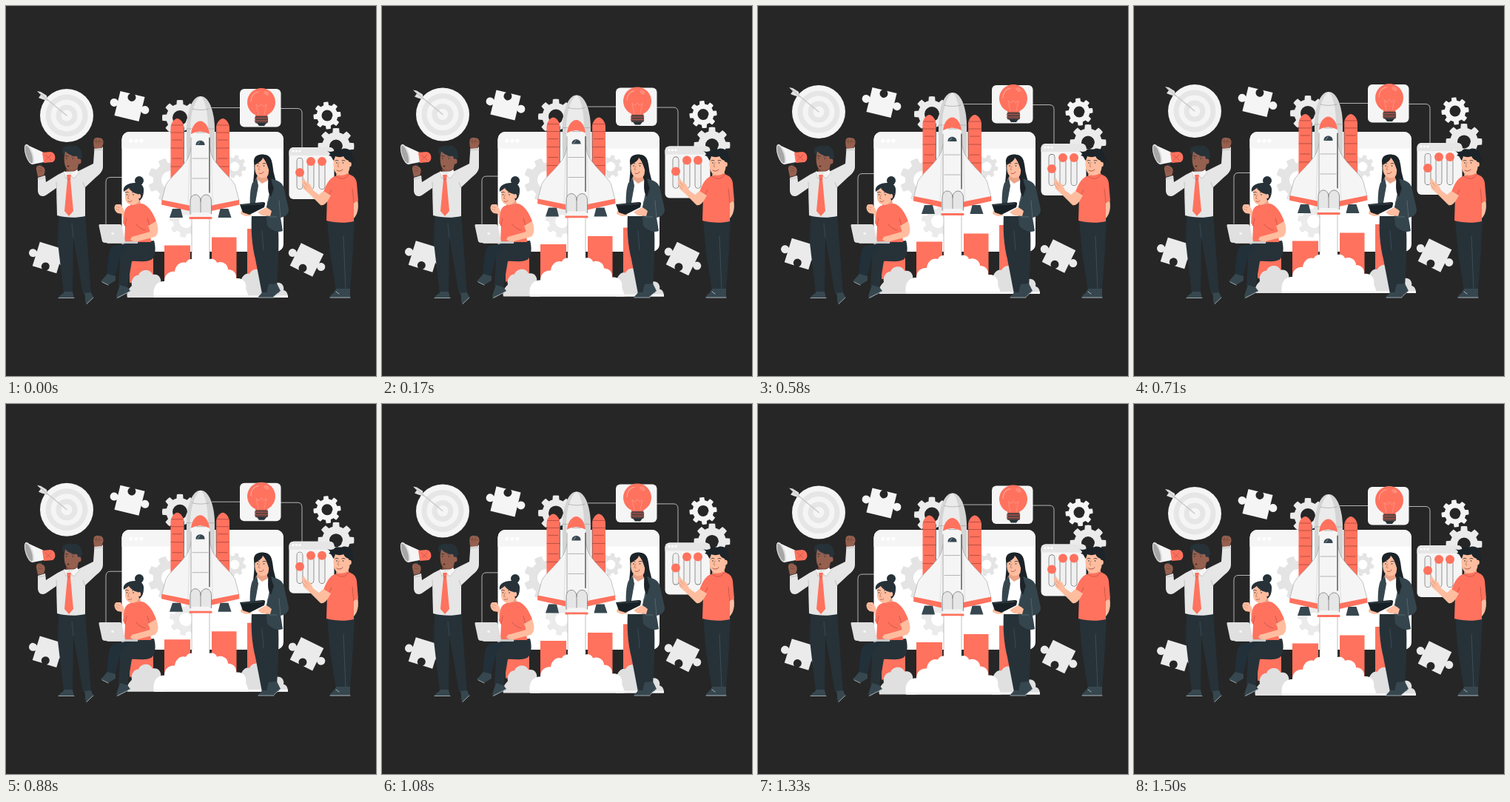
Animation, 500 px wide and 500 px high, one loop 1.54 s. Source, as an HTML page with a canvas:

```html
<!DOCTYPE html>
<html lang="en">
<head>
<meta charset="utf-8">
<title>Launch</title>
<style>
html, body { margin: 0; height: 100%; overflow: hidden; background: #262626; }
canvas { display: block; width: 100vw; height: 100vh; }
</style>
</head>
<body>
<canvas id="stage" width="500" height="500"></canvas>
<script>
const ctx = document.getElementById('stage').getContext('2d');
const BG = '#262626', RED = '#ff725e', DARK = '#263238', INK = '#37474f';
const WHITE = '#fff', PALE = '#f5f5f5', LIGHT = '#ebebeb', GREY = '#e0e0e0';
const SKIN = '#ffbd9f', BROWN = '#96604f', HAIR = '#1c2429';
const LOOP = 1540, SWING = 1500, LIFT = 6.4;

const paths = new Map();
function path(d) {
  if (!paths.has(d)) paths.set(d, new Path2D(d));
  return paths.get(d);
}
function fill(d, color) {
  ctx.fillStyle = color;
  ctx.fill(path(d));
}
function line(d, color = DARK, width = 0.7) {
  ctx.strokeStyle = color;
  ctx.lineWidth = width;
  ctx.stroke(path(d));
}
function disc(x, y, rx, color, ry = rx, turn = 0) {
  ctx.beginPath();
  ctx.ellipse(x, y, rx, ry, turn, 0, 7);
  ctx.fillStyle = color;
  ctx.fill();
}
function box(x, y, w, h, color, radius = 0) {
  ctx.beginPath();
  ctx.roundRect(x, y, w, h, radius);
  ctx.fillStyle = color;
  ctx.fill();
}
function mirrored(axis, draw) {
  draw();
  ctx.save();
  ctx.translate(2 * axis, 0);
  ctx.scale(-1, 1);
  draw();
  ctx.restore();
}

function gear(x, y, r, hole, color, turn = 0) {
  const step = Math.PI / 4, inner = r * 0.77;
  ctx.beginPath();
  for (let i = 0; i < 8; i++) {
    const a = turn + i * step;
    ctx.arc(x, y, r, a - 0.17, a + 0.17);
    ctx.arc(x, y, inner, a + 0.25, a + step - 0.25);
  }
  ctx.closePath();
  ctx.moveTo(x + hole, y);
  ctx.arc(x, y, hole, 0, 7, true);
  ctx.fillStyle = color;
  ctx.fill('evenodd');
}

// Border piece: notch above, tabs left and right, flat below.
function puzzle(x, y, turn, color, s = 17) {
  const q = Math.PI / 2;
  ctx.save();
  ctx.translate(x, y);
  ctx.rotate(turn);
  ctx.beginPath();
  for (let side = 0; side < 4; side++) {
    ctx.lineTo(-s, -s);
    if (side === 0) ctx.arc(0, -s + 4.5, 5.5, -q - 0.6, -q + 0.6, true);
    if (side % 2) ctx.arc(0, -s - 4.5, 5.5, q + 0.6, 5 * q - 0.6);
    ctx.lineTo(s, -s);
    ctx.rotate(q);
  }
  ctx.fillStyle = color;
  ctx.fill();
  ctx.restore();
}

function target() {
  [[36, PALE], [28.5, '#e6e6e6'], [21.5, PALE], [14.5, '#e6e6e6'], [7.5, PALE]]
    .forEach(([r, color]) => disc(82, 148, r, color));
  line('M48 120L82 148', '#c7c7c7', 1.2);
  fill('M42 115L47 116L55 121L56 128L49 126L44 124L47 120Z', GREY);
  line('M46 118L56 127', '#a6a6a6', 0.7);
}

function bulb() {
  box(316, 112, 55.5, 51.5, PALE, 6);
  disc(345, 130, 19, RED);
  box(337, 143, 16.5, 6, RED);
  line('M331 129C331 122 335 117 341 116', '#ffa293', 1.2);
  line('M341 147L338 133L342 136L345 132L348 136L352 133L349 147', '#ff9c8d', 0.7);
  disc(352, 118, 4, '#ff8a79', 2.6, 0.6);
  box(336.5, 148.5, 17.5, 10, '#5b4240', 2);
  line('M336 151.500H354M336 155H354', '#c55c4f', 0.8);
  fill('M339 158H352L349 162H342Z', DARK);
}

function sliders() {
  box(382.5, 191, 61, 70, PALE, 6);
  box(382.5, 191, 61, 11, '#e6e6e6', [6, 6, 0, 0]);
  [388, 392.500, 397].forEach(x => disc(x, 196, 1.6, WHITE));
  [[397, 225], [412, 210], [427, 210]].forEach(([x, y]) => {
    box(x - 4.3, 205, 8.6, 43, '#555', 4.3);
    box(x - 3.7, 205.6, 7.4, 41.8, '#f0f0f0', 3.7);
    disc(x, y, 6, RED);
  });
}

function backdrop() {
  line('M158 231.500H141Q135 231.500 135 238V300M278 137.500H316M371 138.500H394Q400 138.500 400 145V191', '#c4c4c4', 0.9);
  target();
  puzzle(167, 135.5, 0.24, PALE);
  puzzle(57, 340, 0.3 + Math.PI, LIGHT);
  puzzle(406.5, 343, 0.46 + Math.PI, LIGHT);
  gear(235, 151, 24, 10, LIGHT);
  gear(434, 148, 18.5, 7.5, PALE, -0.1);
  gear(446, 189.5, 24.5, 9, LIGHT);
  bulb();
  sliders();
}

function browser() {
  box(156.5, 170, 218.5, 162, WHITE, 10);
  box(156.5, 170, 218.5, 22.5, PALE, [10, 10, 0, 0]);
  [169, 176, 183].forEach(x => disc(x, 182, 2.6, WHITE));
  gear(222, 235, 30, 12, '#e4e4e4', Math.PI / 8);
  gear(309, 217, 15.5, 6.5, '#e4e4e4', 0.2);
  gear(243, 291, 22, 9, LIGHT, 0.2);
}

function booster() {
  fill('M222.500 240V164C223 157 228 152 231.500 152C235 152 240 157 240.500 164V240Z', RED);
  line('M224 161H239M223 171H240M225 181H238M223 192H240M225 206H238M223 217H240', '#a8473c', 0.8);
  line('M240.500 164V236', '#555', 0.7);
}

function halfShuttle() {
  fill('M225 274H236L239 286H221Z', INK);
  fill('M251 188L247 204C236 222 221 232 216 242L210.500 264L248 274H263V188Z', PALE);
  fill('M210.500 262L248 269.500V277L210 268.500Z', RED);
  line('M251 188L247 204C236 222 221 232 216 242L210.500 263', '#999', 0.6);
  line('M248 206L246 270', '#c9c9c9', 0.5);
}

function rocket() {
  fill('M244 250V166C244 147 250 122 263 122C276 122 282 147 282 166V250Z', '#d4d4d4');
  fill('M249 250V166C249 147 255 126 263 122C269 126 273 146 273 166V250Z', LIGHT);
  line('M244 166H282M252 139Q263 142 274 139', '#999', 0.6);
  mirrored(262.250, booster);
  mirrored(262.750, halfShuttle);
  fill('M250 278V174C251 163 256 156 262.500 156C269 156 274 163 275 174V278Z', PALE);
  fill('M250 173C251 162 257 155.500 262.500 155.500C268 155.500 274 162 275 173Q262 166 250 173Z', RED);
  line('M250 178V259', '#777', 0.6);
  line('M275 178V252', '#262626', 1.1);
  line('M257 171H269M252 206H273M252 233H273', '#888', 0.6);
  fill('M256.500 188C256 179.500 269 179.500 268.500 188Z', INK);
  line('M259 187L262 183', '#8da0a9', 1);
  fill('M249 281V264C249 252 263 252 263 264V281ZM263 281V264C263 252 277.500 252 277.500 264V281Z', '#e6e6e6');
  line('M249 281V264C249 252 263 252 263 264V281M263 264C263 252 277.500 252 277.500 264V281', '#666', 0.7);
  fill('M252 279H274L278 285H248Z', PALE);
  box(247.5, 285, 31, 3, RED, 1);
}

function smoke() {
  fill('M164 394C162 386 167 381 170 378C168 368 176 363 179 364C182 355 195 355 198 363C206 361 211 368 209 376L214 394Z', GREY);
  fill('M316 394V374C320 362 325 361 329 362C333 353 347 354 350 364C359 363 363 370 362 375C370 371 377 377 375 384C380 385 381 390 381 394Z', GREY);
  fill('M200 394C198 382 202 372 214 372C214 363 221 358 228 359C229 349 237 345 243 347C245 343 248 342 251 342V288H275V342C280 341 284 343 285 347C292 344 300 349 300 356C307 356 312 361 311 368C321 367 326 375 324 382C326 386 327 390 328 394Z', WHITE);
  line('M251 288V342M275 288V342', '#999', 0.6);
  box(200, 391, 181, 3, PALE);
}

function launch() {
  box(167, 341, 32, 33, RED);
  box(214, 323.5, 35, 50, RED);
  box(278, 312.5, 33.5, 62, RED);
  box(326, 301, 34, 74, RED);
  rocket();
  smoke();
}

function face(x, y) {
  ctx.save();
  ctx.translate(x, y);
  line('M-6 -4Q-4 -5.500 -2 -4M3 -4Q5 -5.500 7 -4', DARK, 0.8);
  line('M-1 -1L-3 4L-1 4.500', '#9e5f50', 0.6);
  disc(-4, -1, 0.8, DARK);
  disc(4.5, -1, 0.8, DARK);
  ctx.restore();
}

function speaker() {
  fill('M71 282H107L110 322L115 389H104L91 313L90 388H78L70 320Z', DARK);
  line('M91 313L89 294', '#455a64', 0.6);
  fill('M79 386H90L92 395H71C71 391 77 390 79 386Z', INK);
  fill('M106 388L115 387L118 394L109 403C106 401 108 394 106 388Z', INK);
  line('M71 394.500H92M109 402.500L118 394', '#b8c0c4', 0.8);
  fill('M82 214H97V224L90 231L81 225Z', '#7c4a3e');
  fill('M78 224L98 223L118 213L119.500 192L131 190.500L131 217C131 223 127 227 122 231L107 245V284C94 287 80 286 69 283L68 246L55 255C48 260 43 255 43 249L43 232L53 229L54 238L70 228Z', '#e6e6e6');
  line('M68 238L69 256M107 246L104 238M43 234L53 232M119 195L131 194', '#b5b5b5', 0.7);
  fill('M79 223L85 228L81 233L77 226ZM96 221L99 226L92 233L86 228Z', PALE);
  line('M78 225L81 233L85 228L92 233L99 225', '#aaa', 0.6);
  fill('M82 228H88L87 234L91 277L85 284L79 277L83 234Z', RED);
  line('M83 234H87', '#c5584a', 0.7);
  fill('M79 198C80 191 98 191 99 201L98 214C97 221 92 223 87 222C79 221 78 212 79 198Z', BROWN);
  fill('M76 198C74 190 84 187 91 189C98 187 104 196 103 204L99 212L96 203C89 203 83 200 80 196L79 203Z', DARK);
  disc(99, 210, 2.6, BROWN, 3.4);
  face(86, 207);
  disc(84, 216.5, 1.4, '#4a2822', 1);
  fill('M119 191C117 181 119 177 125 178C132 178 133 184 130 190L130 192L120 193Z', BROWN);
  line('M119 183H130M122 179V186M126 179V186', '#6d4338', 0.6);
  box(45, 211, 4, 12, DARK, 2);
  fill('M27 187L51 198L51 211L36 214Z', PALE);
  fill('M49 198L60 197C68 198 68 209 63 211L51 212Z', RED);
  line('M53 201L61 208M54 208L61 201', '#b94e42', 0.7);
  disc(31.5, 200.5, 5.2, GREY, 14.3, -0.32);
  disc(31, 200.5, 3.6, '#a6a6a6', 12.3, -0.32);
  fill('M41 221C40 216 45 214 49 217C54 218 53 225 51 229L43 231Z', BROWN);
  line('M44 218L48 220M44 222L49 223', '#6d4338', 0.6);
}

function sitter() {
  fill('M176 318L146 324C139 327 139 337 138 344L136 364L147 367L154 339L180 340Z', '#22303a');
  fill('M137 362L148 365L148 371L138 377L128 372Z', INK);
  fill('M200 317C203 327 202 340 196 343C188 347 177 344 170 345L164 381L152 379L154 342C154 334 161 326 171 320Z', DARK);
  fill('M154 377L164 380L168 385L152 395L149 392Z', INK);
  line('M150 394.500L168 385.500M130 373L138 377', '#bdc6ca', 0.8);
  fill('M159 293L157 281L151 280C146 277 145 270 149 268L155 268L159 275L163 288C163 296 160 297 159 293Z', SKIN);
  fill('M169 262H181L183 272C177 277 171 275 168 270Z', '#eba387');
  fill('M169 269L183 267C192 268 199 280 203 291L194 297L196 319H160L161 298L158 293L160 279C161 273 164 270 169 269Z', RED);
  line('M176 295Q180 301 188 303M194 297L191 287M161 297L163 287', '#b84f43', 0.7);
  fill('M192 297L203 291C207 301 206 309 201 312L174 319L168 316L170 312L195 305Z', SKIN);
  fill('M161 251C161 244 178 241 181 250L180 262C178 268 172 270 167 268C160 265 161 258 161 251Z', SKIN);
  disc(180, 236, 6, DARK);
  fill('M159 251C157 243 166 239 174 239C183 238 187 244 186 250C186 257 183 262 180 263L178 254C172 253 168 249 166 246Z', DARK);
  disc(180, 257, 2.2, SKIN, 3);
  face(167.5, 256);
  line('M165 264Q168 266 170 263', '#a24b40', 0.8);
  line('M149 271L154 273M148 274L153 276', '#c98672', 0.6);
  fill('M134 318H178V321H137Z', '#c7c7c7');
  fill('M127 295H154Q156 295 156.500 297L161 318Q161 320 159 320H134Q131 320 130 318L125.500 297Q125 295 127 295Z', GREY);
  disc(144, 307.5, 1.8, PALE);
}

function manager() {
  fill('M332 282H365C370 300 368 331 368 345L366 380L369 388L354 386L348 332L357 389H346L337 342C332 322 331 302 332 282Z', DARK);
  line('M348 330L346 304', '#455a64', 0.6);
  fill('M355 376L366 375L371 385L361 393L352 388Z', INK);
  fill('M346 387H357L362 394H341C341 391 344 391 346 387Z', INK);
  line('M341 394H362M362 393L371 385', '#b9c3c7', 0.8);
  fill('M335 211C334 202 343 199 350 201C361 203 360 217 362 226C364 235 367 241 364 247L359 258L335 250C332 239 337 230 335 211Z', HAIR);
  fill('M341 226H353V233L359 239L346 250L336 239Z', '#eba387');
  fill('M338 233L346 240L357 234L358 284H332L333 245Z', WHITE);
  fill('M339 233L341 243L336 271L330 272C329 260 330 246 333 239Z', INK);
  fill('M355 232C367 236 374 237 376 248L382 275C382 282 377 285 371 286L374 304C365 307 358 302 353 297L351 276L356 253Z', '#34454d');
  line('M356 236L360 250L353 266M371 286L369 263M356 285H366', '#60737c', 0.7);
  fill('M337 210C338 203 353 203 357 211L356 225C354 232 347 234 342 231C335 227 336 217 337 210Z', SKIN);
  fill('M336 215C335 204 343 200 349 201C358 202 360 209 359 217L357 227C354 218 352 210 347 205C346 210 340 212 336 215Z', HAIR);
  fill('M356 217C358 230 358 237 362 246L358 258C352 250 355 241 354 231Z', HAIR);
  face(344, 217);
  line('M342 226Q346 228 348 224', '#b14d41', 0.9);
  fill('M318 276L327 277L332 283L324 284L317 281ZM344 276L352 272L359 277L357 284L346 283L340 279Z', SKIN);
  fill('M316 268L347 265Q351 265 350 268L349 272L329 282L320 279Z', '#182126');
  line('M318 269L347 267', '#536169', 0.7);
  fill('M344 279L350 273L357 275L356 281L350 282Z', SKIN);
}

function operator() {
  fill('M434 289H471L469 330L465 385H446L438 335Z', DARK);
  line('M456 311L459 384', '#455a64', 0.7);
  fill('M446 382H465V394H438C438 389 443 390 446 382Z', INK);
  line('M438 394H465M446 386L450 389', '#bdc7cb', 0.9);
  fill('M468 258L474 258C477 267 477 280 470 287Z', SKIN);
  fill('M447 219H462L464 232L456 238L446 231Z', '#eba387');
  fill('M445 230L462 227C470 229 473 233 474 239L476 263L470 266V291C458 294 445 293 433 290L434 258L429 251C433 241 437 232 445 230Z', RED);
  line('M470 266L468 247M434 260L440 248M446 230Q456 238 463 228', '#b84f43', 0.7);
  fill('M429 250L439 256C435 264 430 271 425 269L410 254L402 247L400 237L402 232L405 237L411 241L415 249L423 255Z', SKIN);
  line('M403 239L408 244M401 242L406 247', '#c98672', 0.6);
  fill('M443 206C444 197 464 196 466 208L464 221C462 228 455 230 449 228C442 225 442 215 443 206Z', SKIN);
  fill('M443 209C440 206 441 203 436 202C440 200 437 198 434 196C440 198 441 196 443 196C446 191 452 195 455 193C461 191 469 196 468 202C471 207 469 214 465 217L463 209C459 208 457 205 456 203C452 205 447 204 445 203Z', HAIR);
  disc(464.5, 214, 2.3, SKIN, 3.2);
  face(451, 213);
  line('M447 222Q451 225 455 221', '#a6483c', 0.9);
}

function draw(now) {
  const t = now % LOOP;
  const swing = Math.max(0, 1 - Math.abs(t / (SWING / 2) - 1));
  const floating = part => {
    ctx.save();
    ctx.translate(0, -LIFT * swing);
    part();
    ctx.restore();
  };
  ctx.fillStyle = BG;
  ctx.fillRect(0, 0, 500, 500);
  floating(backdrop);
  browser();
  floating(launch);
  [speaker, sitter, manager, operator].forEach(person => person());
}

let start;
function tick(now) {
  start ??= now;
  draw(now - start);
  requestAnimationFrame(tick);
}
ctx.lineCap = ctx.lineJoin = 'round';
draw(0);
requestAnimationFrame(tick);
</script>
</body>
</html>
```
